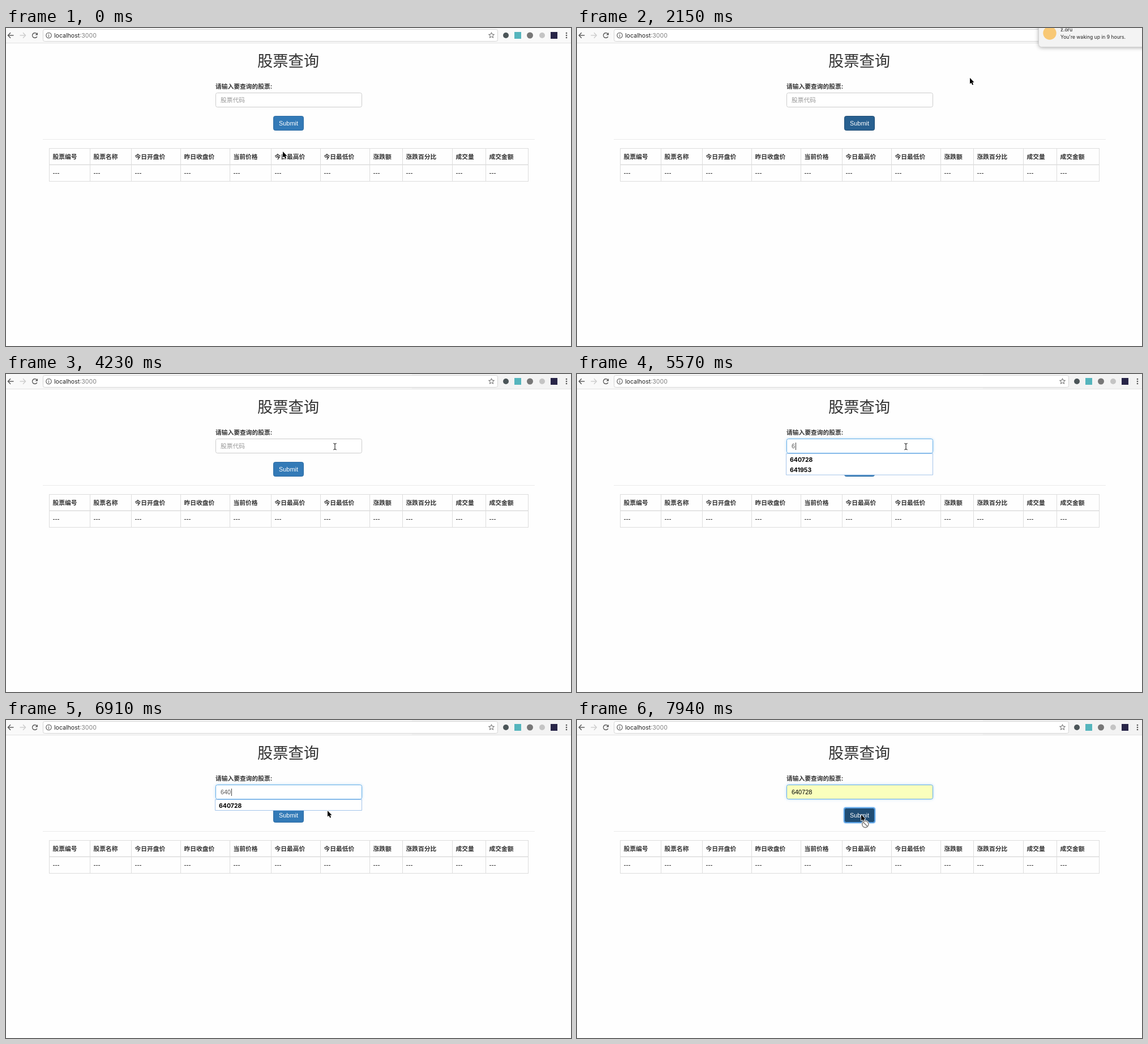
These frames come from a looping animation (998 px wide and 561 px high, 8000 ms). An HTML page with a canvas:

```html
<!DOCTYPE html>
<html lang="zh-CN">
<head>
<meta charset="utf-8">
<title>股票查询</title>
<style>
html, body { margin: 0; width: 100%; height: 100%; overflow: hidden; background: #fefefe; }
canvas { display: block; }
</style>
</head>
<body>
<canvas id="stage" width="998" height="561"></canvas>
<script>
const ctx = document.getElementById('stage').getContext('2d');
const LOOP = 8000;
const SANS = '"Liberation Sans", "Noto Sans CJK SC", "Noto Sans CJK", sans-serif';
const UI = 'Inter, sans-serif';
const BODY = '10.75px ' + SANS;
const INPUT_FONT = '10.9px ' + SANS;
const CODES = ['640728', '641953'];

const HEADERS = ['股票编号', '股票名称', '今日开盘价', '昨日收盘价', '当前价格', '今日最高价',
  '今日最低价', '涨跌额', '涨跌百分比', '成交量', '成交金额'];
const COLUMNS = [76, 148, 221, 308, 395, 468, 555, 642, 700, 788, 847, 922];

// Each track holds [start time, value...]; values hold until the next entry.
const POINTER = [
  [0, 489, 218, 'arrow'], [150, 493, 246, 'arrow'], [300, 499, 295, 'arrow'], [500, 501, 316, 'arrow'],
  [1850, 504, 270, 'arrow'], [2000, 518, 166, 'arrow'], [2150, 694, 88, 'arrow'],
  [2300, 806, 72, 'arrow'], [2450, 852, 67, 'arrow'], [2590, 864, 67, 'arrow'],
  [3490, 826, 77, 'arrow'], [3640, 718, 104, 'arrow'], [3790, 632, 119, 'arrow'],
  [3940, 596, 127, 'beam'], [4080, 584, 128, 'beam'], [4230, 581, 128, 'beam'],
  [6760, 578, 137, 'beam'], [6910, 568, 160, 'arrow'], [7050, 564, 154, 'arrow'],
  [7200, 563, 150, 'arrow'], [7640, 545, 156, 'arrow'], [7790, 507, 166, 'arrow'],
  [7940, 502, 167, 'denied']
];
const BANNER = [[0, 200], [800, 110], [950, 25], [1100, 0], [3490, 70], [3640, 200]];
const BUTTON = [[0, 'idle'], [2000, 'hover'], [2300, 'idle'], [7790, 'hover'], [7940, 'active']];
const TYPED = [[0, 0], [5420, 1], [5870, 2], [6020, 3], [7050, 6]];
const MATCHES = [[0, 0], [5570, 2], [6020, 1], [7200, 0]];
const CARET = [[0, 0], [4530, 1], [4820, 0], [5420, 1], [6470, 0], [6760, 1], [7050, 0], [7200, 1], [7640, 0]];

function at(track, t) {
  let found = track[0];
  for (const key of track) if (key[0] <= t) found = key;
  return found.slice(1);
}

function text(str, x, y, font, color, align = 'left') {
  ctx.font = font;
  ctx.fillStyle = color;
  ctx.textAlign = align;
  ctx.fillText(str, x, y);
}

function rect(x, y, w, h, color) {
  ctx.fillStyle = color;
  ctx.fillRect(x, y, w, h);
}

function box(x, y, w, h, r, fill, stroke) {
  ctx.beginPath();
  ctx.roundRect(x + 0.5, y + 0.5, w - 1, h - 1, r);
  ctx.fillStyle = fill;
  ctx.fill();
  ctx.shadowColor = 'transparent';
  ctx.strokeStyle = stroke;
  ctx.lineWidth = 1;
  ctx.stroke();
}

function glow(color, blur, dy = 0) {
  ctx.shadowColor = color;
  ctx.shadowBlur = blur;
  ctx.shadowOffsetY = dy;
}

function dot(x, y, r, color) {
  ctx.beginPath();
  ctx.arc(x, y, r, 0, 7);
  ctx.fillStyle = color;
  ctx.fill();
}

function line(points, color, width) {
  ctx.beginPath();
  points.forEach(([x, y]) => ctx.lineTo(x, y));
  ctx.strokeStyle = color;
  ctx.lineWidth = width;
  ctx.stroke();
}

function navArrow(x, dir, color) {
  line([[x - 5 * dir, 13], [x + 5 * dir, 13]], color, 1.4);
  line([[x + 0.5 * dir, 8.3], [x + 5 * dir, 13], [x + 0.5 * dir, 17.7]], color, 1.4);
}

function reloadIcon() {
  ctx.beginPath();
  ctx.arc(51, 13, 4.4, 0.5, 5.5);
  ctx.strokeStyle = '#555';
  ctx.lineWidth = 1.4;
  ctx.stroke();
  ctx.beginPath();
  ctx.moveTo(56, 8);
  ctx.lineTo(56, 12.4);
  ctx.lineTo(51.6, 12.4);
  ctx.fillStyle = '#555';
  ctx.fill();
}

function star(x, y) {
  ctx.beginPath();
  for (let i = 0; i < 10; i++) {
    const a = i * Math.PI / 5 - Math.PI / 2;
    const r = i % 2 ? 2.3 : 5.2;
    ctx.lineTo(x + r * Math.cos(a), y + r * Math.sin(a));
  }
  ctx.closePath();
  ctx.strokeStyle = '#666';
  ctx.lineWidth = 1;
  ctx.stroke();
}

function toolbar(t) {
  rect(0, 0, 998, 27, '#f9f9f9');
  if (t >= 3640) rect(717, 0, 281, 27, '#f3f3f3');
  rect(0, 26, 998, 1, '#e2e2e2');
  navArrow(8.5, -1, '#555');
  navArrow(29.5, 1, '#ccc');
  reloadIcon();
  box(65, 2, 804, 22, 3, '#fff', '#d4d4d4');
  ctx.beginPath();
  ctx.arc(75.5, 13, 4.7, 0, 7);
  ctx.strokeStyle = '#555';
  ctx.lineWidth = 1.1;
  ctx.stroke();
  rect(75, 12.3, 1.1, 3.6, '#555');
  rect(75, 10, 1.1, 1.2, '#555');
  text('localhost', 85, 17, '10.6px ' + UI, '#222');
  const hostWidth = ctx.measureText('localhost').width;
  text(':3000', 85 + hostWidth, 17, '10.6px ' + UI, '#808080');
  star(857.5, 13);
  dot(883, 13, 5, '#4b5558');
  rect(898, 7, 12, 12, '#55b5bd');
  dot(925.5, 13, 5.5, '#777');
  dot(947, 13, 5, '#c4c4c4');
  rect(962, 7, 12, 12, '#282548');
  for (const y of [9, 13, 17]) dot(990, y, 1.3, '#555');
}

function banner(offset) {
  if (offset >= 190) return;
  ctx.save();
  ctx.translate(offset, 0);
  glow('rgba(0,0,0,.35)', 7, 1);
  box(815, -20, 200, 54, 5, '#f3f3f3', '#d2d2d2');
  dot(835, 9, 11.7, '#f8c875');
  text('z.oru', 854, 6, '500 8.6px ' + UI, '#333');
  text("You're waking up in 9 hours.", 854, 19, '8.55px ' + UI, '#222');
  ctx.restore();
}

function table() {
  for (const x of COLUMNS) rect(x, 212, 1, 59, '#ddd');
  rect(76, 212, 847, 1, '#ddd');
  rect(76, 240.5, 847, 1.5, '#ddd');
  rect(76, 270, 847, 1, '#ddd');
  HEADERS.forEach((label, i) => {
    text(label, COLUMNS[i] + 6.5, 231, 'bold ' + BODY, '#333');
    text('---', COLUMNS[i] + 6.5, 260, '12px ' + SANS, '#333');
  });
}

function button(state) {
  const [fill, edge] = {
    idle: ['#337ab7', '#2e6da4'],
    hover: ['#286090', '#204d74'],
    active: ['#204d74', '#5aa2e6']
  }[state];
  ctx.save();
  if (state === 'active') {
    glow('#4d9fee', 3);
    box(471, 154, 56, 28, 3, edge, edge);
  }
  box(472, 155, 54, 26, 3, fill, edge);
  text('Submit', 499, 172, '10.9px ' + SANS, '#fff', 'center');
  ctx.restore();
}

function input(t) {
  const [count] = at(TYPED, t);
  const filled = count === 6;
  const focused = t >= 4530;
  ctx.save();
  if (focused) glow('rgba(102,175,233,.6)', 5);
  box(370, 114, 259, 26, 3, filled ? '#faffbd' : '#fff', focused ? '#66afe9' : '#ccc');
  ctx.restore();
  const value = CODES[0].slice(0, count);
  if (value) text(value, 379, 131, INPUT_FONT, filled ? '#000' : '#555');
  else text('股票代码', 379, 131.3, BODY, '#999');
  if (at(CARET, t)[0]) {
    ctx.font = INPUT_FONT;
    rect(Math.round(379.5 + ctx.measureText(value).width), 121, 1, 13, '#444');
  }
}

function suggestions(t) {
  const [count] = at(MATCHES, t);
  if (!count) return;
  box(369, 140, 260, count * 18.5 + 1.5, 0, '#fff', '#a3c4ea');
  if (t >= 7050) rect(370, 141, 258, 18, '#dcdcdc');
  for (let i = 0; i < count; i++) text(CODES[i], 376, 154.5 + i * 18.3, 'bold 10.5px ' + UI, '#000');
}

function pointer(x, y, kind) {
  ctx.save();
  ctx.translate(x, y);
  if (kind === 'beam') {
    for (const [color, width] of [['#fff', 2.6], ['#222', 1.1]]) {
      line([[0, -5], [0, 5]], color, width);
      for (const s of [-1, 1]) line([[-2.6, 5.8 * s], [0, 4.6 * s], [2.6, 5.8 * s]], color, width);
    }
  } else {
    ctx.beginPath();
    for (const [px, py] of [[0, 0], [0, 10.6], [2.4, 8.4], [4.2, 12.6], [6.1, 11.8], [4.4, 7.7], [7.5, 7.7]])
      ctx.lineTo(px, py);
    ctx.closePath();
    ctx.lineJoin = 'round';
    ctx.strokeStyle = '#fff';
    ctx.lineWidth = 1.6;
    ctx.stroke();
    ctx.fillStyle = '#000';
    ctx.fill();
  }
  if (kind === 'denied') {
    dot(7.3, 17, 7.2, '#fff');
    ctx.beginPath();
    ctx.arc(7.3, 17, 5.6, 0, 7);
    ctx.strokeStyle = '#858585';
    ctx.lineWidth = 1.6;
    ctx.stroke();
    line([[3.4, 13.1], [11.2, 20.9]], '#858585', 1.6);
  }
  ctx.restore();
}

function draw(t) {
  rect(0, 0, 998, 561, '#fefefe');
  toolbar(t);
  text('股票查询', 498.5, 68, '500 27.3px ' + SANS, '#333', 'center');
  text('请输入要查询的股票:', 370, 107, 'bold ' + BODY, '#333');
  rect(65, 196, 869, 1, '#eaeaea');
  table();
  button(at(BUTTON, t)[0]);
  input(t);
  suggestions(t);
  banner(at(BANNER, t)[0]);
  pointer(...at(POINTER, t));
}

const start = performance.now();
function tick() {
  draw((performance.now() - start) % LOOP);
  requestAnimationFrame(tick);
}
tick();
</script>
</body>
</html>
```
